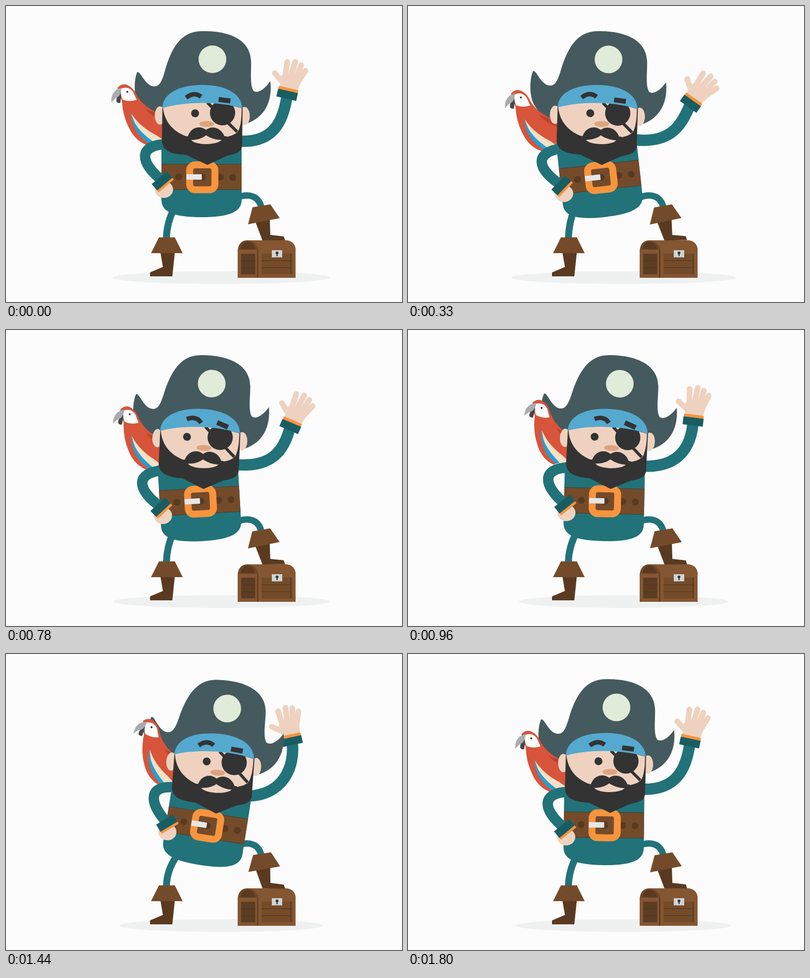
Recreate the animation shown at these times as an HTML page. Size 800x600 px, loop 1830 ms.

```html
<!DOCTYPE html>
<html lang="en">
<head>
<meta charset="utf-8">
<title>Waving pirate</title>
<style>
  html, body { margin: 0; width: 100%; height: 100%; overflow: hidden; background: #fcfcfc; }
  svg { display: block; width: 800px; height: 600px; }
  .teal { fill: #227279; }
  .limb { fill: none; stroke: #227279; }
  .cuff { fill: #195d62; }
  .orange { fill: #f7943e; }
  .skin { fill: #eed2bf; }
  .ink { fill: #333; }
  .brown { fill: #744b2a; }
  .dark { fill: #593a21; }
</style>
</head>
<body>
<svg viewBox="0 0 800 600">
  <ellipse id="shadow" cx="435.3" cy="550.5" ry="13" fill="#eff1f1"/>

  <path id="rightArm" class="limb" stroke-width="23"/>
  <g id="rightHand">
    <path class="skin" d="M-18 -11L-20 -36Q0 -48 23 -38L18 -11Z"/>
    <path d="M-12 -32L-15 -65M-2 -36L1 -69M9 -36L14 -65M17 -34L25 -56M-12 -22Q-22 -27 -34 -37"
      fill="none" stroke="#eed2bf" stroke-width="11.5" stroke-linecap="round"/>
    <rect class="orange" x="-20" y="-14" width="40" height="7"/>
    <rect class="cuff" x="-20.5" y="-8" width="41" height="16"/>
  </g>

  <g id="hat">
    <path fill="#455a5e" d="M265 134C258 150 258 185 268 202C280 222 300 236 320 240H480C512 232 540 205 534 152
      C522 170 508 178 500 172C492 160 496 130 495 110C492 62 440 50 397 51C352 50 334 88 322 128
      C314 158 308 166 294 162C280 156 274 138 267 134Z"/>
    <circle cx="417" cy="108" r="28" fill="#e0ebd9"/>
  </g>

  <g id="parrot">
    <path fill="#d8543a" d="M225 166Q233 157 242 159Q257 164 264 181Q277 203 303 215L325 232V265L288 283
      Q262 275 249 248Q236 224 234 192Z"/>
    <path fill="#b9432f" d="M281 209Q294 224 325 237L302 216Z"/>
    <path fill="#f5e0c6" d="M253 218Q270 245 304 262L317 271L300 281Q266 262 253 218Z"/>
    <path fill="#249fd0" d="M251 213Q256 242 287 267L300 277L294 280Q280 276 266 257Q252 238 251 213Z"/>
    <path fill="#fff" d="M231 168Q246 161 256 173L264 190Q250 195 236 190Q231 181 231 168Z"/>
    <path fill="#45484a" d="M232 176Q222 182 223 194Q227 198 231 196Q233 186 232 176Z"/>
    <path fill="#a9abad" d="M233 166Q211 171 213 196Q219 187 228 183Q233 176 233 166Z"/>
    <circle class="ink" cx="245" cy="174" r="2"/>
  </g>

  <path id="leftLeg" class="limb" stroke-width="14"/>
  <path class="dark" d="M312 500H341L336 548H291V540L317 529Z"/>
  <path class="brown" d="M309 469H341L357 501H293Z"/>
  <path class="limb" stroke-width="13" d="M466 389C492 378 511 386 516 409"/>

  <g id="body">
    <path class="teal" d="M314 270H476V393C476 418 450 428 395 428C340 428 314 418 314 393Z"/>
    <rect class="brown" x="314" y="321" width="162" height="51"/>
    <path d="M314 320.7H476M314 372.3H476" stroke="#4c3a26"/>
    <g class="dark">
      <circle cx="349" cy="346.5" r="7"/><circle cx="397" cy="347" r="7"/>
      <circle cx="433" cy="347" r="7"/><circle cx="458" cy="347.5" r="7"/>
    </g>
    <rect x="371" y="322" width="51" height="50.5" rx="11" fill="none" stroke="#f7943e" stroke-width="14"/>
    <rect x="364.5" y="341" width="31" height="11" fill="#e6e7e8"/>
    <path class="limb" stroke-width="21" d="M325 280C265 282 270 318 318 356"/>
    <ellipse class="skin" cx="319" cy="372" rx="18.5" ry="17"/>
    <g transform="translate(315.5 355) rotate(-40)">
      <rect class="orange" x="-20" y="7" width="40" height="6"/>
      <rect class="cuff" x="-20" y="-9" width="40" height="17"/>
    </g>
  </g>

  <g id="head">
    <ellipse class="skin" cx="311" cy="222" rx="10.5" ry="18.5"/>
    <ellipse class="skin" cx="482" cy="223" rx="10.5" ry="18.5"/>
    <path class="ink" d="M316 204L315 275C318 297 338 300 364 302L407 322L448 303C470 299 477 293 477 280L478 206Z"/>
    <path class="skin" d="M317 205C320 238 342 258 370 266H440C452 265 466 260 470 252C475 240 476 225 476 207Q397 185 317 205Z"/>
    <circle id="eye" class="ink" cx="382" cy="217.5" r="8"/>
    <path d="M407 196L467 255" stroke="#333" stroke-width="6"/>
    <circle class="ink" cx="437.5" cy="216.5" r="25.5"/>
    <path fill="#55a9cf" d="M316 207C316 180 345 160 397 160C450 160 477 182 477 207C430 193 362 193 316 207Z"/>
    <ellipse cx="405.5" cy="239" rx="15" ry="6" fill="#dda47d"/>
    <path class="ink" d="M362 264H446L442 284H366Z"/>
    <path class="skin" d="M374 271Q404 256 436 271Q430 279 404 280Q378 279 374 271Z"/>
    <path class="ink" d="M366 271C368 250 388 239 404 251C420 239 440 251 443 271C428 273 415 269 404 262C395 270 380 273 366 271Z"/>
    <path id="leftBrow" d="M364 186Q380 173 394 184" fill="none" stroke="#333" stroke-width="9"/>
    <g id="rightBrow"><rect class="ink" x="-12" y="-5" width="24" height="10"/></g>
  </g>

  <g id="chest">
    <path fill="#704726" d="M468 551V496Q470 475 488 475H566Q585 477 585 496V551Z"/>
    <path fill="#855632" d="M488 475H566Q585 477 585 496H510Q508 478 488 475Z"/>
    <path class="dark" d="M474 493Q476 478 489 478Q502 480 503 493Z"/>
    <path fill="#855632" d="M468 494H585V502H468ZM468 544H585V551H468ZM504 494H516V551H504ZM468 494H475V551H468ZM578 494H585V551H578Z"/>
    <rect x="475" y="502" width="28" height="42" fill="#5b3d23"/>
    <rect x="516" y="502" width="62" height="42" fill="#744b29"/>
    <path d="M475 516.5H503M475 530.5H503M516 516.5H578M516 530.5H578" stroke="#4f331c"/>
    <path d="M576 502V544M508.5 494V551" stroke="#5b3d23" stroke-width="2.5"/>
    <rect x="537" y="495" width="21" height="14.5" fill="#cfd4d5"/>
    <circle class="ink" cx="547.5" cy="500.5" r="2.8"/>
    <path d="M547.5 501V507" stroke="#333" stroke-width="2.4"/>
  </g>

  <g id="rightBoot">
    <path class="dark" d="M504 438L533 433L534 464L561 467L564 475H518Z"/>
    <path class="brown" d="M498 408L534 402L553 430L489 442.5Z"/>
  </g>
</svg>
<script>
const LOOP = 1830, STEP = 30;
const times = [30, 330, 570, 960, 1200, 1440, 1800];
const el = id => document.getElementById(id);
const set = (id, name, value) => el(id).setAttribute(name, value);
const move = (id, value) => set(id, 'transform', value);

// Smooth looping curve through one value per key time.
function curve(...values) {
  const n = times.length;
  const time = i => times[(i + n) % n] + LOOP * Math.floor(i / n);
  const value = i => values[(i + n) % n];
  const slope = i => (value(i + 1) - value(i - 1)) / (time(i + 1) - time(i - 1));
  return t => {
    let i = 0;
    while (i < n - 1 && t >= times[i + 1]) i++;
    const h = time(i + 1) - time(i), u = (t - time(i)) / h, v = 1 - u;
    return v * v * (1 + 2 * u) * value(i) + u * u * (3 - 2 * u) * value(i + 1)
      + h * u * v * (v * slope(i) - u * slope(i + 1));
  };
}

function ramp(t, from, to) {
  const u = Math.min(1, Math.max(0, (t - from) / (to - from)));
  return u * u * (3 - 2 * u);
}

const motion = {
  shadow: curve(219.5, 226.5, 226, 211.5, 203, 206, 218),
  tilt: curve(0, -6.2, -7.3, 1.2, 7.3, 9, 0.7),
  headX: curve(0, -13.5, -15.2, 7.2, 21.5, 24.5, 3),
  headY: curve(0, 0, 0, 0, 0.7, 1.2, 0),
  headTurn: curve(0, 1, 1.3, 2.3, 3.2, 3.4, 0.7),
  birdX: curve(0, -17, -15, 25, 48, 49, 4),
  birdY: curve(0, 11.5, 10.5, -16, -25.5, -25.5, -3),
  birdTurn: curve(0, 0, 0, 10, 16, 15, 1),
  shoulderX: curve(470, 456, 454, 474, 486, 488, 471),
  shoulderY: curve(274, 271, 271, 276, 286, 288, 274),
  handX: curve(568, 570.5, 572, 576, 576, 578, 569.5),
  handY: curve(180, 198, 205, 185.5, 176.5, 176.5, 179.5),
  handTurn: curve(13, 35.5, 39, 7, -11.5, -12, 12)
};

function draw(t) {
  const p = {};
  for (const key in motion) p[key] = motion[key](t);
  const look = ramp(t, 640, 780) - ramp(t, 1240, 1380);

  set('shadow', 'rx', p.shadow);
  move('body', `rotate(${p.tilt} 395 410)`);
  const headPose = `translate(${p.headX} ${p.headY}) rotate(${p.headTurn} 397 200)`;
  move('hat', headPose);
  move('head', headPose);
  move('eye', `translate(${-11.5 * look})`);
  move('leftBrow', `translate(${6 * look}) rotate(${17 * look} 379 180)`);
  move('rightBrow', `translate(441.5 191) rotate(${7 + 15 * look})`);
  move('parrot', `translate(${p.birdX} ${p.birdY}) rotate(${p.birdTurn} 245 174)`);

  // The wrist bends further than the forearm.
  const a = 0.6 * p.handTurn * Math.PI / 180;
  const upper = [p.shoulderX + 70, p.shoulderY + 4 - 0.6 * p.tilt];
  const lower = [p.handX - 55 * Math.sin(a), p.handY + 55 * Math.cos(a)];
  set('rightArm', 'd', `M${p.shoulderX} ${p.shoulderY}C${upper} ${lower} ${p.handX} ${p.handY}`);
  move('rightHand', `translate(${p.handX} ${p.handY}) rotate(${p.handTurn})`);

  const hip = 340 + 0.5 * p.tilt;
  set('leftLeg', 'd', `M${hip} 410Q325 438 324 471`);
  move('rightBoot', `rotate(${0.12 * p.tilt} 530 475)`);
}

const start = performance.now();
function frame() {
  const t = (performance.now() - start) % LOOP;
  draw(Math.max(STEP, Math.floor(t / STEP) * STEP));
  requestAnimationFrame(frame);
}
frame();
</script>
</body>
</html>
```
